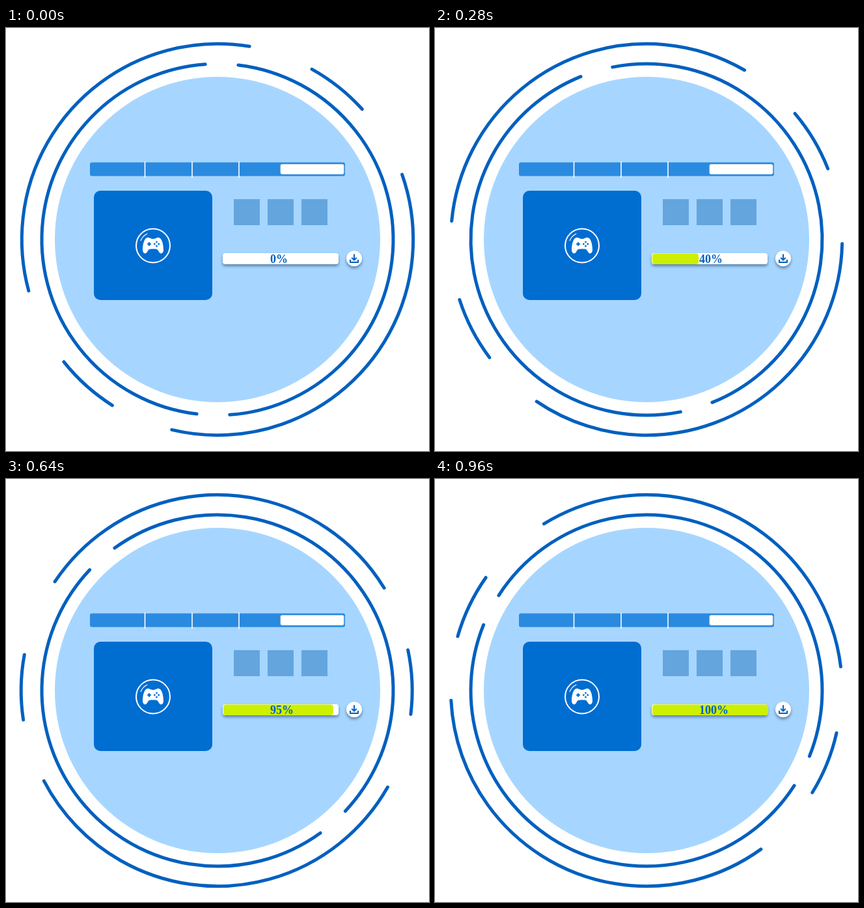
An HTML page with a canvas that plays this animation: 650x650 px, repeating every 1000 ms.

```html
<!DOCTYPE html>
<html lang="en">
<head>
<meta charset="utf-8">
<title>Download progress</title>
<style>
html, body { margin: 0; width: 100%; height: 100%; overflow: hidden; background: #fff; }
canvas { display: block; }
</style>
</head>
<body>
<canvas id="stage" width="650" height="650"></canvas>
<script>
const ctx = document.getElementById('stage').getContext('2d');
const LOOP = 1000, STEP = 40, C = 325;
const INK = '#0060bf', SKY = '#a6d6ff', CARD = '#006dd1';

// step index and outer ring rotation in degrees
const SPIN = [[0, 0], [3, 9.05], [7, 20.65], [10, 29.7], [16, 49], [21, 64.5], [24, 73.6]];

function spinAt(n) {
  let i = 1;
  while (i < SPIN.length - 1 && n > SPIN[i][0]) i++;
  const [n0, a0] = SPIN[i - 1], [n1, a1] = SPIN[i];
  return a0 + (a1 - a0) * (n - n0) / (n1 - n0);
}

function box(x, y, w, h, r, fill) {
  ctx.fillStyle = fill;
  ctx.beginPath();
  ctx.roundRect(x, y, w, h, r);
  ctx.fill();
}

function disc(x, y, r, fill) {
  ctx.fillStyle = fill;
  ctx.beginPath();
  ctx.arc(x, y, r, 0, Math.PI * 2);
  ctx.fill();
}

function shadow(on) {
  ctx.shadowColor = on ? 'rgba(0,30,70,.45)' : 'transparent';
  ctx.shadowBlur = on ? 4 : 0;
  ctx.shadowOffsetY = on ? 3 : 0;
}

function line(color, width, ...points) {
  ctx.strokeStyle = color;
  ctx.lineWidth = width;
  ctx.beginPath();
  points.forEach(([x, y]) => ctx.lineTo(x, y));
  ctx.stroke();
}

// angles in degrees, clockwise from the top
function ringArc(r, from, to) {
  const rad = a => (a - 90) * Math.PI / 180;
  ctx.strokeStyle = INK;
  ctx.lineWidth = 5;
  ctx.beginPath();
  ctx.arc(C, C, r, rad(from), rad(to));
  ctx.stroke();
}

function rings(spin) {
  ringArc(300.7, 70.6 + spin, 193.5 + spin);
  ringArc(300.7, 254.8 + spin, 369.4 + spin);
  ringArc(299.2, 29 + spin, 48 + spin);
  ringArc(301.8, 212.4 + spin, 231.5 + spin);
  const back = -0.87 * spin;
  ringArc(270, 6.8 + back, 176 + back);
  ringArc(270, 186.8 + back, 356 + back);
}

function topBar() {
  box(129, 206.5, 392, 21, 3, '#2a8ae0');
  for (const x of [213.5, 286, 358]) line('#fff', 1.6, [x, 205.5], [x, 230]);
  box(421.5, 209, 98, 16, 3, '#d5dfea');
  box(422.5, 210, 96, 14, 2.5, '#fff');
}

function gamepad() {
  ctx.strokeStyle = '#fff';
  ctx.lineWidth = 2;
  ctx.beginPath();
  ctx.arc(226, 334.5, 26, 0, Math.PI * 2);
  ctx.stroke();
  ctx.lineWidth = 1.2;
  ctx.beginPath();
  ctx.arc(226, 334.5, 20.5, Math.PI * 1.12, Math.PI * 1.36);
  ctx.stroke();

  ctx.save();
  ctx.translate(226, 334);
  ctx.fillStyle = '#fff';
  ctx.beginPath();
  ctx.moveTo(0, -10);
  for (const s of [1, -1]) {
    const to = (a, b, c, d, e, f) => ctx.bezierCurveTo(s * a, b, s * c, d, s * e, f);
    if (s > 0) {
      to(4, -10, 5, -12, 8, -12);
      to(14, -12, 16, 0, 16, 7);
      to(16, 13, 11, 14, 9, 10);
      to(7, 6, 6, 5.5, 0, 5.5);
    } else {
      to(6, 5.5, 7, 6, 9, 10);
      to(11, 14, 16, 13, 16, 7);
      to(16, 0, 14, -12, 8, -12);
      to(5, -12, 4, -10, 0, -10);
    }
  }
  ctx.fill();
  ctx.restore();

  line(CARD, 2.2, [217.2, 332], [222.8, 332]);
  line(CARD, 2.2, [220, 329.2], [220, 334.8]);
  for (const [dx, dy] of [[0, -3.2], [0, 3.2], [-3.2, 0], [3.2, 0]])
    disc(231.5 + dx, 332 + dy, 1.4, CARD);
}

function progress(value) {
  shadow(true);
  box(333, 346, 178, 17, 4, '#fff');
  disc(535, 354.3, 12, '#fff');
  shadow(false);
  if (value > 0) box(334, 346.5, 1.78 * value, 16.5, 4, '#cdf000');

  ctx.fillStyle = INK;
  ctx.font = 'bold 18px "Liberation Serif", serif';
  ctx.fillText(Math.round(value) + '%', 406, 361);

  line(INK, 2, [535, 347.5], [535, 356]);
  line(INK, 2, [531.3, 353], [535, 356.6], [538.7, 353]);
  line(INK, 2, [529, 356], [529, 360], [541, 360], [541, 356]);
}

function draw(ms) {
  const spin = spinAt(Math.floor((ms % LOOP) / STEP));
  ctx.fillStyle = '#fff';
  ctx.fillRect(0, 0, 650, 650);
  ctx.lineCap = 'round';
  rings(spin);
  ctx.lineCap = 'butt';
  disc(C, C, 250, SKY);
  topBar();
  box(135, 250, 182, 168, 10, CARD);
  gamepad();
  for (const x of [350, 402, 454]) box(x, 263, 40, 40, 0, '#64a5de');
  progress(Math.min(100, spin * 1.935));
}

let start;
function tick(now) {
  start ??= now;
  draw(now - start);
  requestAnimationFrame(tick);
}
draw(0);
requestAnimationFrame(tick);
</script>
</body>
</html>
```
